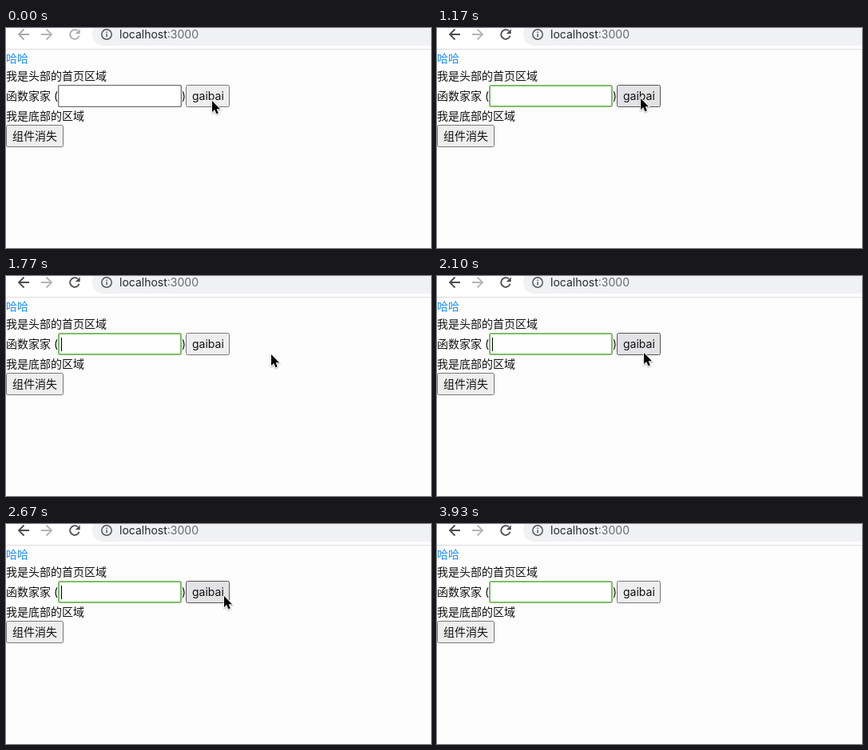
An HTML page with a canvas for the animation above (4.01 s loop, 532 px wide and 275 px high).

```html
<!DOCTYPE html>
<html lang="zh">
<head>
<meta charset="utf-8">
<style>
  html, body { margin: 0; width: 100%; height: 100%; overflow: hidden; background: #fefdfe; }
  canvas { display: block; }
</style>
</head>
<body>
<canvas id="stage" width="532" height="275"></canvas>
<script>
const ctx = document.getElementById('stage').getContext('2d');
const LOOP = 4010;
const LATIN = '14px Inter, sans-serif';
const CJK = '14px "Noto Sans CJK SC", "Noto Sans CJK", sans-serif';

// Pointer path: time, x, y of the tip
const PATH = [
  [0, 258, 91], [370, 258, 91], [470, 255, 88], [1400, 255, 88],
  [1500, 400, 90], [1600, 517, 94], [1700, 390, 98], [1770, 332, 98],
  [1930, 294, 99], [2030, 270, 98], [2100, 259, 96], [2230, 256, 92],
  [2300, 257, 90], [2640, 257, 90], [2670, 273, 90], [2700, 398, 88]
];
const POINTER_GONE = 2730;
const PRESSES = [[600, 730], [2300, 2430]];
const CARET = [[730, 1170], [1670, 2170], [2430, 2930], [3430, 3930]];

const within = (t, spans) => spans.some(([from, to]) => t >= from && t < to);

function pointerAt(t) {
  const i = PATH.findIndex(p => p[0] > t);
  if (i < 0) return PATH[PATH.length - 1].slice(1);
  const [t0, x0, y0] = PATH[i - 1], [t1, x1, y1] = PATH[i];
  const k = (t - t0) / (t1 - t0);
  return [x0 + (x1 - x0) * k, y0 + (y1 - y0) * k];
}

function text(str, x, y, color = '#111', font = CJK) {
  ctx.font = font;
  ctx.fillStyle = color;
  ctx.fillText(str, x, y);
  return x + ctx.measureText(str).width;
}

function box(x, y, w, h, r, fill, stroke, width = 1) {
  const d = width / 2;
  ctx.beginPath();
  ctx.roundRect(x + d, y + d, w - width, h - width, r);
  ctx.fillStyle = fill;
  ctx.fill();
  ctx.strokeStyle = stroke;
  ctx.lineWidth = width;
  ctx.stroke();
}

function strokePath(color, width, draw) {
  ctx.beginPath();
  draw();
  ctx.strokeStyle = color;
  ctx.lineWidth = width;
  ctx.stroke();
}

function arrow(tail, tip, color) {
  const back = Math.sign(tail - tip) * 6.5;
  strokePath(color, 1.8, () => {
    ctx.moveTo(tail, 8);
    ctx.lineTo(tip, 8);
    ctx.moveTo(tip + back, 1.5);
    ctx.lineTo(tip, 8);
    ctx.lineTo(tip + back, 14.5);
  });
}

function toolbar(active) {
  const color = active ? '#4a4d51' : '#a9abae';
  ctx.fillStyle = '#fff';
  ctx.fillRect(0, 0, 532, 26);
  ctx.fillStyle = '#dcdde0';
  ctx.fillRect(0, 26, 532, 1);

  arrow(29, 16, color);
  arrow(44, 57, '#b4b6b9');
  strokePath(color, 1.8, () => ctx.arc(86, 8, 5.8, 0.3, 5.4));
  ctx.beginPath();
  ctx.moveTo(92.7, 1.2);
  ctx.lineTo(92.7, 7.2);
  ctx.lineTo(86.7, 7.2);
  ctx.fillStyle = color;
  ctx.fill();

  ctx.beginPath();
  ctx.roundRect(108, -6, 460, 28, 14);
  ctx.fillStyle = '#f0f1f3';
  ctx.fill();
  strokePath('#55585c', 1.5, () => ctx.arc(126, 8, 6.2, 0, 7));
  ctx.fillStyle = '#55585c';
  ctx.fillRect(125.3, 7.3, 1.5, 4);
  ctx.fillRect(125.3, 4.6, 1.5, 1.5);
  const end = text('localhost', 142, 13, '#26282b', LATIN);
  text(':3000', end, 13, '#66696d', LATIN);
}

function pointer(x, y) {
  ctx.save();
  ctx.translate(x, y);
  ctx.beginPath();
  ctx.moveTo(0, 0);
  for (const [px, py] of [[0, 14], [3.2, 11.1], [5.4, 16.2], [7.8, 15.2], [5.6, 10.2], [10, 10.2]])
    ctx.lineTo(px, py);
  ctx.closePath();
  ctx.shadowColor = 'rgba(0,0,0,.35)';
  ctx.shadowBlur = 2;
  ctx.shadowOffsetY = 1;
  ctx.strokeStyle = '#fff';
  ctx.lineWidth = 1.8;
  ctx.stroke();
  ctx.shadowColor = 'transparent';
  ctx.fillStyle = '#000';
  ctx.fill();
  ctx.restore();
}

function buttonColors(t, x, y) {
  if (within(t, PRESSES)) return ['#f5f5f5', '#8d8d8d'];
  const hover = t >= 400 && t < POINTER_GONE && x < 280 && y < 99;
  return hover ? ['#e3e2e4', '#55555a'] : ['#efeeef', '#767676'];
}

function render(t) {
  const [x, y] = pointerAt(t);
  const focused = t >= PRESSES[0][1] && !within(t, PRESSES);

  ctx.fillStyle = '#fefdfe';
  ctx.fillRect(0, 0, 532, 275);
  toolbar(t >= 130);

  text('哈哈', 0, 43, '#1890ff');
  text('我是头部的首页区域', 0, 65);
  text('函数家家', 0, 90);
  text('(', 60, 90, '#111', LATIN);
  text(')', 220, 90, '#111', LATIN);
  text('我是底部的区域', 0, 115);

  if (focused) box(65, 71, 155, 28, 2, '#fff', '#7dbd6b', 2);
  else box(65, 71, 155, 28, 1, '#fff', '#6f6f6f', 1.3);
  if (within(t, CARET)) {
    ctx.fillStyle = '#000';
    ctx.fillRect(69, 77, 1, 17);
  }

  box(225, 71, 55, 28, 2, ...buttonColors(t, x, y));
  text('gaibai', 233, 90, '#111', LATIN);
  box(0, 121, 72, 28, 2, '#efeeef', '#767676');
  text('组件消失', 8, 140);

  if (t < POINTER_GONE) pointer(x, y);
}

function snap(t) {
  const step = Math.floor((t + 4) * 0.03);
  return Math.round(step / 0.3) * 10;
}

function tick() {
  render(snap(performance.now() % LOOP));
  requestAnimationFrame(tick);
}
tick();
</script>
</body>
</html>
```
